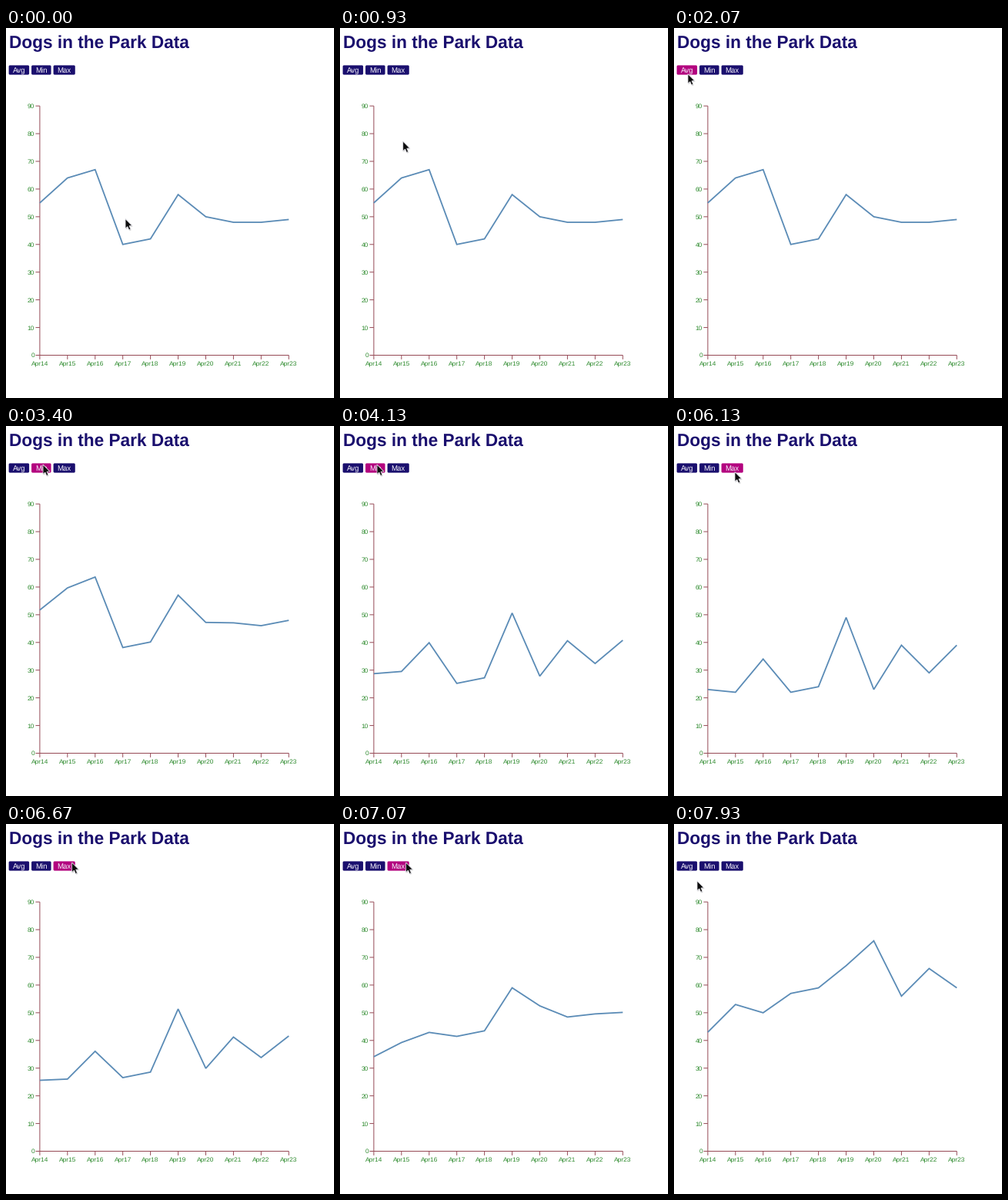
These frames come from a looping animation (426x480 px, 8 s). A matplotlib script:

```python
import numpy as np
import matplotlib.pyplot as plt
from matplotlib.animation import FuncAnimation
from matplotlib.patches import FancyBboxPatch, Polygon

plt.rcParams["toolbar"] = "None"
plt.rcParams["font.family"] = "Liberation Sans"
plt.rcParams["text.hinting"] = "none"

W, H, DPI = 426, 480, 96
FRAMES, INTERVAL = 160, 50
PT = 72 / DPI

NAVY, MAGENTA = "#1a0f6e", "#b3047f"
AXIS, LABEL, LINE = "#964a56", "#2e8b2e", "#5a8bb6"

LEFT, BOTTOM, STEP = 43.9, 424.5, 35.93
DAYS = np.arange(10)
SERIES = {
    "Avg": np.array([55, 64, 67, 40, 42, 58, 50, 48, 48, 49]),
    "Min": np.array([23, 22, 34, 22, 24, 49, 23, 39, 29, 39]),
    "Max": np.array([43, 53, 50, 57, 59, 67, 76, 56, 66, 59]),
}
CLICKS = [("Min", 2835), ("Max", 6036)]
MORPH = 2000

BTN_X, BTN_TOP, BTN_H, BTN_PAD, BTN_GAP = 3.6, 48.4, 12.2, 5, 3

# pointer: first place, then start time and goal of each move
HOME = (155, 247.5)
MOVES = [(700, 18, 59.5), (2090, 48, 50), (5000, 79, 59.5),
         (6200, 85.6, 50), (7490, 30, 73.8)]
MOVE = 430

fig = plt.figure(figsize=(W / DPI, H / DPI), dpi=DPI, facecolor="white")
ax = fig.add_axes([0, 0, 1, 1])
ax.set_xlim(0, W)
ax.set_ylim(H, 0)
ax.axis("off")


def text(x, y, s, px, color, **kw):
    return ax.text(x, y, s, fontsize=px * PT, color=color, va="baseline", **kw)


def stroke(xs, ys, color, px, **kw):
    return ax.plot(xs, ys, color=color, lw=px * PT, solid_capstyle="butt",
                   snap=False, **kw)[0]


def day_x(i):
    return LEFT + i * STEP


def value_y(v):
    return BOTTOM - v * STEP / 10


def draw_axes():
    stroke([LEFT, LEFT], [value_y(90), BOTTOM], AXIS, 1)
    stroke([LEFT, day_x(9)], [BOTTOM, BOTTOM], AXIS, 1)
    for i in DAYS:
        x, y = day_x(i), value_y(10 * i)
        stroke([LEFT - 5.4, LEFT], [y, y], AXIS, 1)
        stroke([x, x], [BOTTOM, BOTTOM + 5.4], AXIS, 1)
        text(LEFT - 7, y + 2.9, str(10 * i), 8.4, LABEL, ha="right")
        text(x, 438, f"Apr{14 + i}", 8.4, LABEL, ha="center")


def draw_buttons():
    boxes, x = [], BTN_X
    for name in SERIES:
        label = text(x + BTN_PAD, BTN_TOP + 9.4, name, 9.6, "#f4f2fa", zorder=4)
        width = label.get_window_extent().width + 2 * BTN_PAD
        box = FancyBboxPatch((x, BTN_TOP), width, BTN_H,
                             boxstyle="round,pad=0,rounding_size=1.6",
                             fc=NAVY, ec="none", zorder=3)
        boxes.append(ax.add_patch(box))
        x += width + BTN_GAP
    return boxes


def arrow_shape(size, angle):
    """Mirror half an arrow along its axis, then tilt it."""
    half = np.array([(0, 0), (5, 12.2), (1.25, 10.9), (1.25, 15.8)])
    across, along = size * np.vstack([half, half[:0:-1] * (-1, 1)]).T
    c, s = np.cos(angle), np.sin(angle)
    return np.column_stack([along * s + across * c, along * c - across * s])


def progress(ms, start, duration):
    return min(max((ms - start) / duration, 0), 1)


def cubic_in_out(t):
    return 4 * t**3 if t < 0.5 else 1 - 4 * (1 - t)**3


def values_at(ms):
    values = SERIES["Avg"]
    for name, start in CLICKS:
        k = cubic_in_out(progress(ms, start, MORPH))
        values = values + (SERIES[name] - values) * k
    return values


def pointer_at(ms):
    tip = np.array(HOME)
    for start, *goal in MOVES:
        p = progress(ms, start, MOVE)
        tip = tip + (np.array(goal) - tip) * p * p * (3 - 2 * p)
    return tip


def hovers(box, tip):
    dx, dy = tip[0] - box.get_x(), tip[1] - box.get_y()
    return 0 <= dx <= box.get_width() and 0 <= dy <= box.get_height()


text(3.6, 26, "Dogs in the Park Data", 22.65, NAVY, weight="bold")
boxes = draw_buttons()
draw_axes()
curve = stroke(day_x(DAYS), value_y(SERIES["Avg"]), LINE, 1.8,
               solid_joinstyle="miter", zorder=5)
ARROW = arrow_shape(0.96, np.pi / 8)
shadow = Polygon(ARROW, fc="black", ec="none", alpha=0.18, zorder=8)
arrow = Polygon(ARROW, fc="#0c0c0c", ec="#e8e8ee", lw=0.8 * PT, zorder=9)
ax.add_patch(shadow)
ax.add_patch(arrow)


def update(i):
    ms = (i + 0.5) * INTERVAL
    tip = pointer_at(ms)
    curve.set_ydata(value_y(values_at(ms)))
    for box in boxes:
        box.set_facecolor(MAGENTA if hovers(box, tip) else NAVY)
    arrow.set_xy(ARROW + tip)
    shadow.set_xy(ARROW + tip + (0.8, 1.2))
    return [curve, *boxes, shadow, arrow]


anim = FuncAnimation(fig, update, frames=FRAMES, interval=INTERVAL,
                     repeat=True, repeat_delay=0, blit=False)
plt.show()
```
